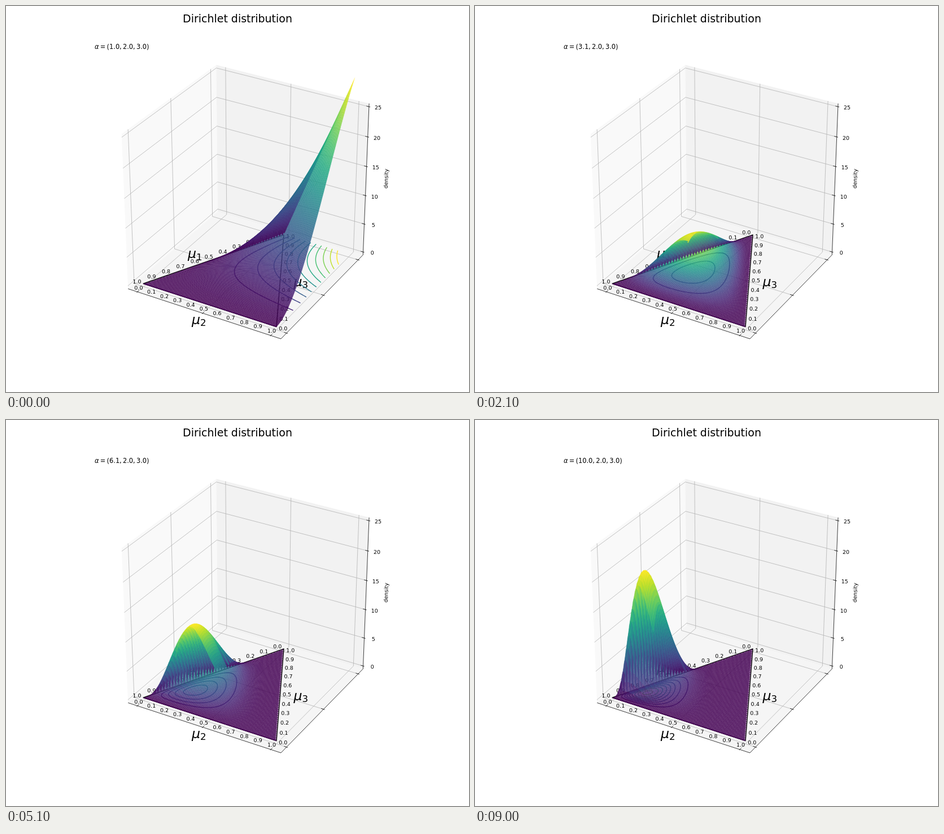
These frames come from a looping animation (820x683 px, 9.1 s). An HTML page with a canvas:

```html
<!DOCTYPE html>
<html lang="en">
<head>
<meta charset="utf-8">
<title>Dirichlet distribution</title>
<style>
  html, body { margin: 0; width: 100%; height: 100%; overflow: hidden; background: #fff; }
  canvas { display: block; }
</style>
</head>
<body>
<canvas id="plot" width="820" height="683"></canvas>
<script>
const W = 820, H = 683, STEP = 100, COUNT = 91;
const SANS = '"DejaVu Sans", sans-serif';
const SMALL = 9.49, ALPHA = 0.85;
const ctx = document.getElementById('plot').getContext('2d');

// ---- projection: unit box seen from elevation 30, azimuth -60, distance 10
const C3 = Math.sqrt(3) / 2;
function project(x, y, z) {
  x -= 0.5; y -= 0.5; z -= 0.5;
  const right = C3 * x + 0.5 * y;
  const up = -0.25 * x + C3 / 2 * y + C3 * z;
  const w = 10 - (C3 / 2 * x - 0.75 * y + 0.5 * z);
  return [427.6 + 3000 * right / w, 338 - 3000 * up / w, -10 / w];
}
const unit = v => (v + 0.05) / 1.1;
const place = (x, y, z = 0) => project(unit(x), unit(y), z / 25);

// ---- colour
const VIRIDIS = ['440154', '482475', '414487', '355f8d', '2a788e', '21918c',
  '22a884', '44bf70', '7ad151', 'bddf26', 'fde725']
  .map(h => [0, 2, 4].map(i => parseInt(h.substr(i, 2), 16)));
function viridis(t) {
  t = Math.max(0, Math.min(1, t)) * 10;
  const i = Math.min(9, Math.floor(t)), f = t - i;
  const c = VIRIDIS[i].map((v, k) => Math.round(v + (VIRIDIS[i + 1][k] - v) * f));
  return `rgb(${c})`;
}

// ---- drawing helpers
function trace(g, pts) {
  g.beginPath();
  pts.forEach((p, i) => i ? g.lineTo(p[0], p[1]) : g.moveTo(p[0], p[1]));
}
function line(g, pts, color, width) {
  trace(g, pts);
  g.strokeStyle = color;
  g.lineWidth = width;
  g.stroke();
}
function fill(g, pts, color) {
  trace(g, pts);
  g.closePath();
  g.fillStyle = color;
  g.fill();
}
function label(g, s, x, y, size = SMALL) {
  g.font = `${size}px ${SANS}`;
  g.textAlign = 'center';
  g.fillText(s, x, y + size * 0.365);
}
function mu(g, n, x, y) {
  g.textAlign = 'left';
  g.font = `italic 23.7px ${SANS}`;
  g.fillText('μ', x, y);
  const w = g.measureText('μ').width;
  g.font = `16.6px ${SANS}`;
  g.fillText(n, x + w, y + 3.8);
}

// ---- everything that stays still
function drawBox(g) {
  const lo = -1 / 48, hi = 1 + 1 / 48;
  const P = project;
  const GRID = '#b0b0b0', LW = 0.76;
  fill(g, [P(lo, lo, lo), P(lo, hi, lo), P(lo, hi, hi), P(lo, lo, hi)], '#f9f9f9');
  fill(g, [P(lo, hi, lo), P(hi, hi, lo), P(hi, hi, hi), P(lo, hi, hi)], '#f2f2f2');
  fill(g, [P(lo, lo, lo), P(hi, lo, lo), P(hi, hi, lo), P(lo, hi, lo)], '#f5f5f5');

  const ticks = [0, 0.5, 1].map(unit);
  const heights = [0, 5, 10, 15, 20, 25];
  for (const t of ticks) {
    line(g, [P(t, lo, lo), P(t, hi, lo), P(t, hi, hi)], GRID, LW);
    line(g, [P(hi, t, lo), P(lo, t, lo), P(lo, t, hi)], GRID, LW);
  }
  for (const h of heights) {
    const z = h / 25;
    line(g, [P(lo, lo, z), P(lo, hi, z), P(hi, hi, z)], GRID, LW);
  }
  line(g, [P(lo, lo, lo), P(hi, lo, lo), P(hi, hi, lo), P(hi, hi, hi)], '#000', LW);

  const out = 0.1 / 12, inn = 0.2 / 12;
  for (const t of ticks) {
    line(g, [P(t, lo - out, lo), P(t, lo + inn, lo)], '#000', LW);
    line(g, [P(hi + out, t, lo), P(hi - inn, t, lo)], '#000', LW);
  }
  g.fillStyle = '#000';
  for (const h of heights) {
    const z = h / 25, p = P(hi, hi, z);
    line(g, [P(hi + out, hi, z), P(hi - inn, hi, z)], '#000', LW);
    label(g, h, p[0] + 16.2, p[1] + 1.6);
  }
}

function drawLabels(g) {
  g.fillStyle = '#000';
  for (let i = 0; i <= 10; i++) {
    const t = i / 10, s = t.toFixed(1);
    const front = place(t, 0), side = place(1 - t / 2, t), back = place((1 - t) / 2, 1 - t);
    label(g, s, front[0] - 8.4, front[1] + 7.2);
    label(g, s, side[0] + 11.7, side[1] + 3.1);
    label(g, s, back[0] - 11.3, back[1] - 4);
  }
  mu(g, '1', 322, 446);
  mu(g, '2', 329, 562.5);
  mu(g, '3', 509.5, 495.5);
  label(g, 'Dirichlet distribution', 410, 21.6, 18.98);
  g.save();
  g.translate(673, 305.5);
  g.rotate(-88 * Math.PI / 180);
  label(g, 'density', 0, 0);
  g.restore();
}

const still = document.createElement('canvas');
still.width = W;
still.height = H;
{
  const g = still.getContext('2d');
  g.fillStyle = '#fff';
  g.fillRect(0, 0, W, H);
  drawBox(g);
  drawLabels(g);
  const a = place(0, 0), b = place(1, 0), c = place(0.5, 1);
  g.lineJoin = 'round';
  line(g, [a, b, c, a, b], '#000', 1.42);
  line(g, [a, b], viridis(0), 1.42);
}

// ---- density on a square grid; NaN outside the support
const N = 100, M = N - 1;
function sample(a) {
  const k = a * (a + 1) * (a + 2) * (a + 3) * (a + 4) / 2;
  const rows = [];
  for (let i = 0; i < N; i++) {
    const row = [];
    for (let j = 0; j < N; j++) {
      const m3 = i / M, m2 = (j - i / 2) / M, m1 = (M - j - i / 2) / M;
      // a flat first factor puts no bound on m1
      const inside = m2 >= 0 && (m1 >= 0 || a === 1);
      row.push(inside ? k * Math.pow(m1, a - 1) * m2 * m3 * m3 : NaN);
    }
    rows.push(row);
  }
  return rows;
}

function drawContours(z) {
  ctx.lineWidth = 1.42;
  ctx.lineCap = 'round';
  for (let level = 2.5; level <= 25; level += 2.5) {
    ctx.beginPath();
    for (let i = 0; i < M; i++) for (let j = 0; j < M; j++) {
      const ring = [[i, j], [i, j + 1], [i + 1, j + 1], [i + 1, j]];
      const v = ring.map(([r, c]) => z[r][c] - level);
      if (v.some(isNaN)) continue;
      const hits = [];
      for (let e = 0; e < 4; e++) {
        const n = (e + 1) % 4;
        if ((v[e] > 0) === (v[n] > 0)) continue;
        const f = v[e] / (v[e] - v[n]);
        hits.push(place(
          (ring[e][1] + f * (ring[n][1] - ring[e][1])) / M,
          (ring[e][0] + f * (ring[n][0] - ring[e][0])) / M));
      }
      for (let h = 0; h + 1 < hits.length; h += 2) {
        ctx.moveTo(hits[h][0], hits[h][1]);
        ctx.lineTo(hits[h + 1][0], hits[h + 1][1]);
      }
    }
    ctx.strokeStyle = viridis(level / 25);
    ctx.stroke();
  }
  ctx.lineCap = 'butt';
}

function drawSurface(z) {
  const grid = z.map((row, i) => row.map((v, j) => place(j / M, i / M, v)));
  const cells = [];
  let min = Infinity, max = -Infinity;
  for (let i = 0; i < M; i++) for (let j = 0; j < M; j++) {
    const pts = [grid[i][j], grid[i][j + 1], grid[i + 1][j + 1], grid[i + 1][j]];
    const avg = (z[i][j] + z[i][j + 1] + z[i + 1][j + 1] + z[i + 1][j]) / 4;
    const depth = (pts[0][2] + pts[1][2] + pts[2][2] + pts[3][2]) / 4;
    if (avg < min) min = avg;
    if (avg > max) max = avg;
    cells.push({ pts, avg, depth });
  }
  // NaN depths stay in the sort: the broken order makes the scallops
  cells.reverse().sort((p, q) => p.depth < q.depth ? -1 : 0).reverse();
  ctx.globalAlpha = ALPHA;
  ctx.lineWidth = 0.2;
  ctx.lineJoin = 'round';
  for (const c of cells) {
    if (isNaN(c.avg)) continue;
    fill(ctx, c.pts, viridis((c.avg - min) / (max - min)));
    ctx.strokeStyle = ctx.fillStyle;
    ctx.stroke();
  }
  ctx.globalAlpha = 1;
}

function drawParams(a) {
  const size = 11.39, gap = size * 0.2;
  const parts = [['α', gap, 'italic '], ['=', gap], [`(${a.toFixed(1)},`, gap],
    ['2.0,', gap], ['3.0)', 0]];
  let x = 157;
  ctx.fillStyle = '#000';
  ctx.textAlign = 'left';
  for (const [s, space, style = ''] of parts) {
    ctx.font = `${style}${size}px ${SANS}`;
    ctx.fillText(s, x, 76.4);
    x += ctx.measureText(s).width + space;
  }
}

function draw(k) {
  const a = 1 + k / 10, z = sample(a);
  ctx.drawImage(still, 0, 0);
  drawParams(a);
  drawContours(z);
  drawSurface(z);
}

const start = performance.now();
let shown = -1;
function tick() {
  const k = Math.floor((performance.now() - start) / STEP) % COUNT;
  if (k !== shown) {
    shown = k;
    draw(k);
  }
  requestAnimationFrame(tick);
}
tick();
</script>
</body>
</html>
```
